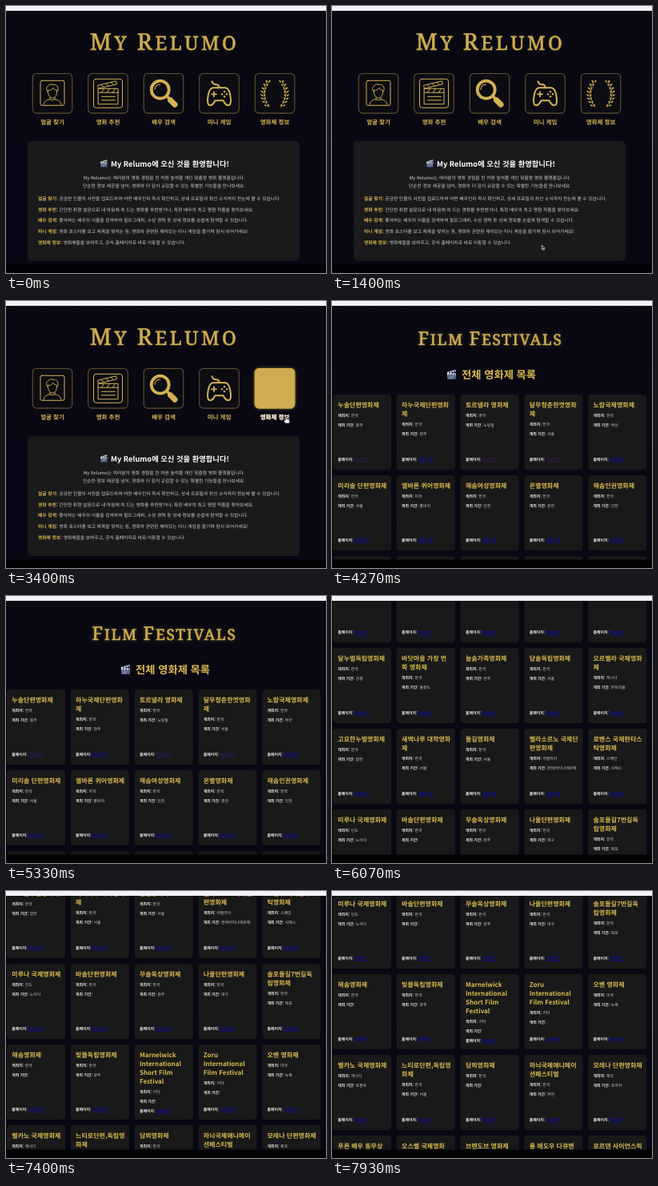
Write an HTML page that moves like this. It is 400 by 334 pixels and loops after 8000 ms.

```html
<!DOCTYPE html>
<html lang="ko">
<head>
<meta charset="utf-8">
<title>My Relumo</title>
<style>
  html, body { margin: 0; width: 100%; height: 100%; overflow: hidden; background: #020204; }
  svg { display: block; width: 100vw; height: 100vh; }
  text { font-family: "Noto Sans CJK KR", "Noto Sans KR", "Noto Sans CJK", "Noto Sans CJK JP", sans-serif;
         text-rendering: geometricPrecision; white-space: pre; }
  .logo, .logo tspan { font-family: "Noto Serif", "Liberation Serif", serif; font-weight: 400;
                       fill: #cfae50; stroke: #cfae50; stroke-width: .6; }
  .gold { fill: #d9b850; font-weight: 700; }
  .bold { font-weight: 700; }
  .mid { text-anchor: middle; }
  .line { fill: none; stroke: #d4b154; stroke-linecap: round; stroke-linejoin: round; }
</style>
</head>
<body>
<svg viewBox="0 0 400 334" xmlns="http://www.w3.org/2000/svg">
  <defs>
    <linearGradient id="night" x1="0" y1="0" x2="0" y2="1">
      <stop offset="0" stop-color="#090812"/><stop offset="1" stop-color="#090714"/>
    </linearGradient>
    <clipPath id="view"><rect y="6" width="400" height="317.5"/></clipPath>
    <filter id="glow" x="-30%" y="-30%" width="160%" height="160%"><feGaussianBlur stdDeviation="2"/></filter>
    <g id="clapper">
      <rect x="1" y="4.6" width="11" height="8" rx="1" fill="#555d8c"/>
      <rect x="1" y="4.6" width="11" height="2.4" fill="#d9dde6"/>
      <path d="M.8 3.6 11.4.4 12 2.6 1.4 5.4Z" fill="#e3e6ee"/>
      <path d="M3 3l1.8 1.5M6 2.1l1.8 1.5M9 1.2l1.8 1.5M3 7l1.6-2.2M6.3 7l1.6-2.2M9.6 7l1.6-2.2" stroke="#343b49" stroke-width="1.1"/>
      <path d="M3 9.2h7M3 11h4" stroke="#9ba6c4" stroke-width=".7"/>
    </g>
  </defs>
  <rect width="400" height="334" fill="#020204"/>
  <rect y="6" width="400" height="317.5" fill="url(#night)"/>
  <g clip-path="url(#view)">
    <g id="home"></g>
    <g id="fest"></g>
  </g>
  <rect width="400" height="6" fill="#f2f4fc"/>
  <path id="arrow" d="M0 0V5.2L1.3 4.1 2.2 6 3 5.6 2.2 3.8H3.9Z" fill="#111" stroke="#fff" stroke-width=".7"/>
  <path id="hand" d="M-.8.5Q0-.5.8.5V3L4 3.8Q4.8 4.1 4.6 5L4 8H-.6L-3 5Q-3 3.6-.8 4.4Z" fill="#fff" stroke="#111" stroke-width=".6"/>
</svg>
<script>
const LOOP = 8000, PAGE_SWITCH = 3870;
const byId = id => document.getElementById(id);
const home = byId('home'), fest = byId('fest');

function add(parent, tag, attrs = {}, content = '') {
  const node = document.createElementNS('http://www.w3.org/2000/svg', tag);
  for (const key in attrs) node.setAttribute(key, attrs[key]);
  if (content) node.textContent = content;
  parent.append(node);
  return node;
}

const label = (parent, x, y, size, text, cls = '', fill = '#d4d4d4') =>
  add(parent, 'text', { x, y, 'font-size': size, class: cls, fill }, text);

function pair(parent, x, y, size, head, tail, headClass, tailAttrs = {}) {
  const node = label(parent, x, y, size, '');
  add(node, 'tspan', { class: headClass, fill: '#f2f2f2' }, head);
  add(node, 'tspan', {}, ' ');
  add(node, 'tspan', tailAttrs, tail);
}

// Small-capital heading with larger initials.
function logo(parent, y, big, small, spacing, glow, words) {
  const draw = extra => {
    const node = add(parent, 'text', { x: 198, y, class: 'logo mid', 'letter-spacing': spacing, ...extra });
    words.forEach((word, i) => {
      add(node, 'tspan', { 'font-size': big }, word[0]);
      add(node, 'tspan', { 'font-size': small }, word.slice(1).toUpperCase() + (i < words.length - 1 ? ' ' : ''));
    });
  };
  draw({ filter: 'url(#glow)', opacity: glow });
  draw({});
}

const stroke = (parent, d, width = 1.4) => add(parent, 'path', { d, class: 'line', 'stroke-width': width });

// Icons are drawn around their own centre.
const icons = [
  g => {
    stroke(g, 'M-13-16H13Q15-16 15-14V13Q15 15 13 15H-13Q-15 15-15 13V-14Q-15-16-13-16Z', 1);
    stroke(g, 'M-6-2Q-9-6-6-9-3-13 1-11 7-11 7-6 8-4 6-2M-5.5-4Q-6 5 0 6 6 5 5.5-4 2-4 1-7-1-3-5.5-4M-3 5V7.5Q-10 8-11 14M3 5V7.5Q10 8 11 14M-3 7.5Q0 10 3 7.5', .9);
  },
  g => {
    stroke(g, 'M-15-18H15Q18-18 18-15V15Q18 18 15 18H-15Q-18 18-18 15V-15Q-18-18-15-18Z', 1);
    stroke(g, 'M-12-6H12.5V13.5H-12ZM-12-1H12.5M-12-6-13-10 10-15.5 11-11.5-12-6M-8.5-11-5.5-8M-2.5-12.5.5-9.5M3.5-14 6.5-11M-8-1-5-6M-1-1 2-6M6-1 9-6M-8 4H9M-8 8.5H9', 1);
  },
  g => {
    add(g, 'circle', { cx: -4.3, cy: -4.6, r: 11, class: 'line', 'stroke-width': 3.8 });
    stroke(g, 'M5 4.5 8 7.5', 3.5);
    stroke(g, 'M8.5 8.5 14 14', 7);
    stroke(g, 'M-11-5Q-10.5-11-4.5-11.3', 1.2);
  },
  g => {
    stroke(g, 'M-7-7H7C12-7 14 0 14.5 9 14.5 17 9 17 5 9H-5C-9 17-14.5 17-14.5 9-14 0-12-7-7-7ZM0-7Q0-11-4-11T-9-15', 2);
    stroke(g, 'M-6.5-2V4M-9.5 1H-3.5', 1.8);
    [[6.5, -2], [6.5, 4], [3.5, 1], [9.5, 1]].forEach(([cx, cy]) => add(g, 'circle', { cx, cy, r: 1.2, fill: '#d4b154' }));
  },
  g => [-1, 1].forEach(side => {
    const branch = add(g, 'g', { transform: `scale(${side} 1)` });
    stroke(branch, 'M9-16Q20 1 8 17', .6);
    for (let i = 0; i < 8; i++) {
      const y = -15 + i * 4.3, x = 14.5 - (y - 1) ** 2 / 42;
      [[1.8, 35], [-1.8, -30]].forEach(([dx, turn]) => add(branch, 'ellipse', {
        rx: .8, ry: 1.9, fill: '#d4b154', transform: `translate(${x + dx} ${y}) rotate(${turn + i * 5})`
      }));
    }
  })
];

logo(home, 55, 29, 24, 3.5, .12, ['My', 'Relumo']);

const menu = ['얼굴 찾기', '영화 추천', '배우 검색', '미니 게임', '영화제 정보'];
let hoverFill, hoverLabel;
menu.forEach((name, i) => {
  const cx = 58 + i * 69.5;
  const tile = add(home, 'g', { transform: `translate(${cx} 109.3)` });
  const box = { x: -24.8, y: -24.8, width: 49.6, height: 49.6, rx: 5 };
  add(tile, 'rect', { ...box, fill: '#0d0c13', stroke: '#5f5230', 'stroke-width': 1.1 });
  icons[i](tile);
  if (i === 4) {
    hoverFill = add(tile, 'g');
    add(hoverFill, 'rect', { ...box, fill: '#d4af37', filter: 'url(#glow)', opacity: .7 });
    add(hoverFill, 'rect', { ...box, fill: '#cfad50', stroke: '#cfad50' });
  }
  label(home, cx, 147.6, 7.5, name, 'gold mid');
  if (i === 4) hoverLabel = label(home, cx, 147.6, 7.5, name, 'bold mid', '#fff');
});

add(home, 'rect', { x: 27, y: 169, width: 340, height: 150, rx: 5, fill: '#1a191b' });
add(home, 'use', { href: '#clapper', transform: 'translate(117.5 192) scale(.75)' });
label(home, 131, 200.5, 9.3, 'My Relumo에 오신 것을 환영합니다!', 'bold', '#fff');
label(home, 197.5, 217.3, 5.78, 'My Relumo는 여러분의 영화 경험을 한 차원 높여줄 개인 맞춤형 영화 플랫폼입니다.', 'mid');
label(home, 197.5, 227.2, 5.78, '단순한 정보 제공을 넘어, 영화와 더 깊이 교감할 수 있는 특별한 기능들을 만나보세요.', 'mid');
[
  '궁금한 인물의 사진을 업로드하여 어떤 배우인지 즉시 확인하고, 상세 프로필과 최신 소식까지 한눈에 볼 수 있습니다.',
  '간단한 취향 설문으로 내 마음에 쏙 드는 영화를 추천받거나, 특정 배우의 최고 평점 작품을 찾아보세요.',
  '좋아하는 배우의 이름을 검색하여 필모그래피, 수상 경력 등 상세 정보를 손쉽게 탐색할 수 있습니다.',
  '영화 포스터를 보고 제목을 맞히는 등, 영화와 관련된 재미있는 미니 게임을 즐기며 잠시 쉬어가세요!',
  '영화제들을 보여주고, 공식 홈페이지로 바로 이동할 수 있습니다.'
].forEach((text, i) => pair(home, 40, 242.8 + i * 13.75, 5.78, menu[i] + ':', text, 'gold'));

logo(fest, 54.5, 23, 19, 1.8, .35, ['Film', 'Festivals']);
add(fest, 'use', { href: '#clapper', transform: 'translate(143 85.5)' });
label(fest, 162, 96.7, 13.3, '전체 영화제 목록', 'gold');

// title (| breaks the line) / country / city
const festivals = `누솔단편영화제/한국/충주
하누국제단편영화|제/한국/청주
토르넬라 영화제/영국/노팅힐
달무청춘한껏영화|제/한국/서울
노람국제영화제/한국/부산
미리솔 단편영화제/한국/서울
엘바론 퀴어영화제/미국/롱비치
해솜여성영화제/한국/인천
온별영화제/한국/춘천
해솜인권영화제/한국/인천
달누벌독립영화제/한국/강릉
바닷마을 가장 먼|쪽 영화제/한국/울릉도
늘솜가족영화제/한국/전주
담솔독립영화제/한국/서울
오르벨라 국제영화|제/캐나다/몬트리올
고요한누벌영화제/한국/합천
새벽나루 대학영화|제/한국/서울
들길영화제/한국/서울
벨라소르노 국제단|편영화제/이탈리아/몬테카티니테르메
로벤스 국제판타스|틱영화제/스페인/시체스
미루나 국제영화제/인도/노이다
바솔단편영화제/한국/
무솔옥상영화제/한국/원주
나울단편영화제/한국/대구
솔포들길7번길독|립영화제/한국/목포
해솜영화제/한국/
빛뜰독립영화제/한국/광주
Marnelwick|International|Short Film|Festival/기타/
Zoru|International|Film Festival/기타/
오벤 영화제/미국/뉴욕
벨카노 국제영화제/캐나다/토론토
느티로단편,독립영|화제/한국/서울
담뫼영화제/한국/
하늬국제애니메이|션페스티벌/한국/부천
모레나 단편영화제/체코/프라하
푸른 배우 동무상/미국/
오스벨 국제영화|제/아일랜드/더블린
브렌도브 영화제/미국/
롱 메도우 다큐멘|터리 영화제/미국/
로르덴 사이언스픽|션 영화제/미국/보스턴`.split('\n').map(row => row.split('/'));

const VISITED = [0, 2, 3];
festivals.forEach(([title, country, city], i) => {
  const card = add(fest, 'g', { transform: `translate(${1 + (i % 5) * 79.8} ${117 + Math.floor(i / 5) * 101})` });
  add(card, 'rect', { width: 73, height: 94, rx: 4, fill: '#191919' });
  const lines = title.split('|');
  lines.forEach((text, n) => label(card, 6.3, 16 + n * 11, 8, text, 'gold'));
  const infoY = 16.9 + lines.length * 11;
  pair(card, 6.3, infoY, 4.9, '개최지:', country, 'bold');
  pair(card, 6.3, infoY + 12, 4.9, '개최 기간:', city, 'bold');
  pair(card, 6.3, Math.max(83, infoY + 24), 4.9, '홈페이지:', '바로가기', 'bold',
    { fill: VISITED.includes(i) ? '#3f1a86' : '#0a06e0', 'text-decoration': 'underline' });
});

const clamp = v => Math.min(1, Math.max(0, v));
const progress = (t, from, to) => clamp((t - from) / (to - from));
const easeOut = (p, power) => 1 - (1 - p) ** power;
const smooth = p => p * p * (3 - 2 * p);
const show = (node, on) => node.setAttribute('visibility', on ? 'visible' : 'hidden');

function render(t) {
  const onHome = t < PAGE_SWITCH;
  home.style.display = onHome ? '' : 'none';
  fest.style.display = onHome ? 'none' : '';

  const hover = progress(t, 2380, 2600);
  hoverFill.setAttribute('opacity', hover);
  hoverLabel.setAttribute('opacity', hover);

  const move = smooth(progress(t, 1850, 2450));
  const place = `translate(${262.3 + 87.7 * move} ${299.3 - 154.3 * move})`;
  const pointing = t >= 2380;
  [byId('arrow'), byId('hand')].forEach(node => node.setAttribute('transform', place));
  show(byId('arrow'), t >= 950 && !pointing);
  show(byId('hand'), onHome && pointing);

  const scroll = 305 * easeOut(progress(t, 5400, 6500), 1.9) + 216 * easeOut(progress(t, 7050, 8050), 2);
  fest.setAttribute('transform', `translate(0 ${-scroll})`);
}

const start = performance.now();
function tick() {
  render((performance.now() - start) % LOOP);
  requestAnimationFrame(tick);
}
render(0);
requestAnimationFrame(tick);
</script>
</body>
</html>
```
